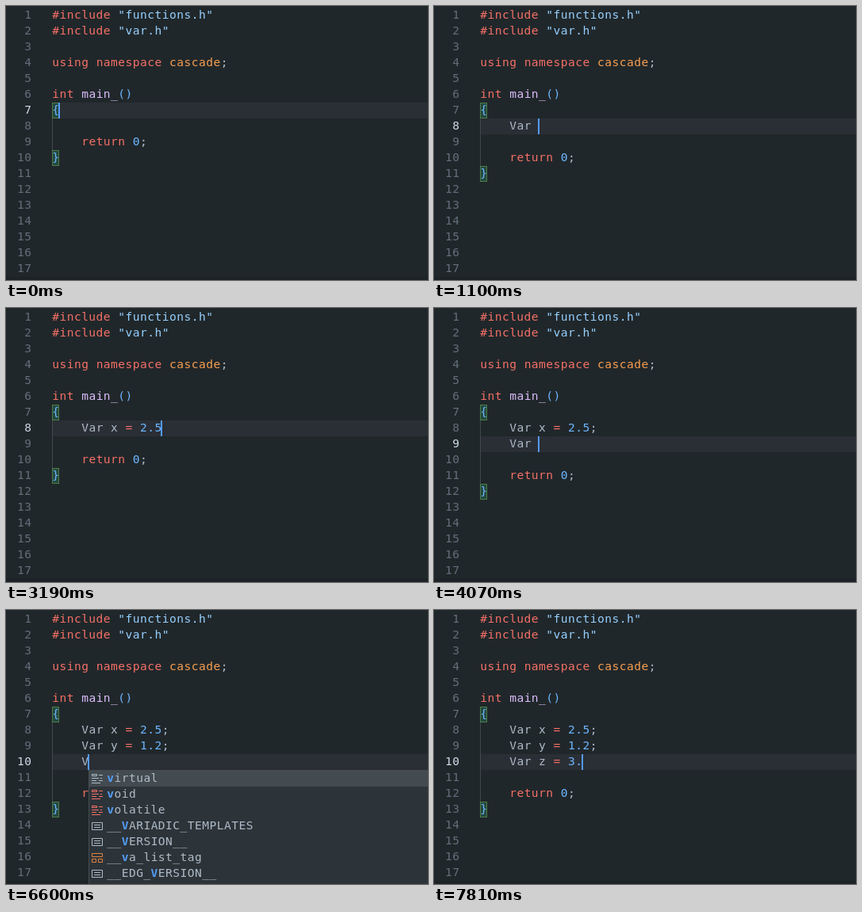
Animation of 532x346 px, one loop 8 s. Source, as an HTML page:

```html
<!DOCTYPE html>
<html lang="en">
<head>
<meta charset="utf-8">
<title>Code editor</title>
<style>
html, body { margin: 0; width: 100%; height: 100%; overflow: hidden; background: #20272a; }
svg { display: block; }
text { font: 14.6px "DejaVu Sans Mono", monospace; letter-spacing: .45px; white-space: pre; }
</style>
</head>
<body>
<svg id="stage" width="532" height="346"></svg>
<script>
const LOOP = 8000, LEFT = 58, CHAR = 9.24, ROW = 20;
const stage = document.getElementById('stage');
const plain = '#adbac7', red = '#f47067', blue = '#6cb6ff', accent = '#539bf5';

const head = ['#include "functions.h"', '#include "var.h"', '', 'using namespace cascade;', '', 'int main_()', '{'];
const tail = ['', '    return 0;', '}'];
const done = ['    Var x = 2.5;', '    Var y = 1.2;'];

// time, active line, its text, flags: o = caret hidden, p = suggestions, d = details
const steps = [
  [0, 7, '{'], [220, 7, '{', 'o'], [440, 8, ''],
  [770, 8, 'V', 'p'], [880, 8, 'V', 'pd'], [990, 8, 'Var', 'pd'], [1100, 8, 'Var '],
  [1430, 8, 'Var ', 'o'], [1650, 8, 'Var '], [1870, 8, 'Var x', 'pd'],
  [2090, 8, 'Var x '], [2200, 8, 'Var x ='], [2310, 8, 'Var x = '], [2530, 8, 'Var x = ', 'o'],
  [2860, 8, 'Var x = 2'], [2970, 8, 'Var x = 2.'], [3190, 8, 'Var x = 2.5'], [3410, 8, 'Var x = 2.5;'],
  [3520, 9, ''], [3850, 9, 'V', 'pd'], [3960, 9, 'Var', 'pd'], [4070, 9, 'Var '],
  [4290, 9, 'Var y', 'pd'], [4400, 9, 'Var y'], [4620, 9, 'Var y ='], [4730, 9, 'Var y = '],
  [5060, 9, 'Var y = ', 'o'], [5280, 9, 'Var y = '], [5390, 9, 'Var y = 1'], [5500, 9, 'Var y = 1.'],
  [5610, 9, 'Var y = 1.2'], [5830, 9, 'Var y = 1.2', 'o'], [6050, 9, 'Var y = 1.2;'], [6270, 10, ''],
  [6490, 10, 'V'], [6600, 10, 'V', 'p'], [6710, 10, 'V', 'pd'], [6820, 10, 'Var', 'pd'], [6930, 10, 'Var '],
  [7150, 10, 'Var z'], [7370, 10, 'Var z ='], [7480, 10, 'Var z = '], [7700, 10, 'Var z = 3'], [7810, 10, 'Var z = 3.']
];

const lists = {
  V: 'virtual void volatile __VARIADIC_TEMPLATES __VERSION__ __va_list_tag __EDG_VERSION__ __cpp_variable_templates __cpp_variadic_templates',
  Var: '__VARIADIC_TEMPLATES __cpp_variable_templates __cpp_variadic_templates',
  x: 'xor xor_eq __x86_64 __x86_64__ __FLT32X_DECIMAL_DIG__ __FLT32X_DENORM_MIN__ __FLT32X_DIG__ __FLT32X_EPSILON__ __FLT32X_HAS_DENORM__',
  y: 'co_yield dynamic_cast typedef typeid typename __BYTE_ORDER__'
};

const icons = {
  keyword: 'M1.5 2.5h6v2h-6zM10 3.5h5M1 7.5h9M12 7.5h2M1 10.5h6M10 10.5h5M1 13.5h11',
  constant: 'M1.5 3.5h13v9h-13zM4 6.5h8M4 9.5h8',
  struct: 'M1.5 2.5h13v4h-13zM1.5 9.5h5v4h-5zM9.5 9.5h5v4h-5z'
};

const lineTop = n => 2 + ROW * (n - 1);
const rect = (x, y, w, h, fill, more = '') =>
  `<rect x="${x}" y="${y}" width="${w}" height="${h}" fill="${fill}" ${more}/>`;
const text = (x, y, s, fill, more = '') => `<text x="${x}" y="${y}" fill="${fill}" ${more}>${s}</text>`;
const stroke = (x, y, d, color) =>
  `<path transform="translate(${x} ${y})" d="${d}" fill="none" stroke="${color}"/>`;

function colorOf(token) {
  if (/^(#\w+|using|namespace|int|return|=)$/.test(token)) return red;
  if (token[0] === '"') return '#96d0ff';
  if (token === 'cascade') return '#f69d50';
  if (token === 'main_') return '#dcbdfb';
  return /^[\d(){}]/.test(token) ? blue : plain;
}

function codeLine(s, y) {
  let out = '';
  for (const m of s.matchAll(/"[^"]*"|#?[A-Za-z_]+|\d[\d.]*|\S/g))
    out += text(LEFT + .2 + m.index * CHAR, y, m[0], colorOf(m[0]));
  return out;
}

function suggestion(word, query, x, y, first) {
  const kind = word === '__va_list_tag' ? 'struct' : word.startsWith('__') ? 'constant' : 'keyword';
  const color = kind === 'struct' ? '#e0823d' : kind === 'constant' || first ? plain : red;
  const at = word.toLowerCase().indexOf(query.toLowerCase()), end = at + query.length;
  const label = `${word.slice(0, at)}<tspan fill="${accent}" font-weight="700">${word.slice(at, end)}</tspan>${word.slice(end)}`;
  return stroke(x + 3, y + 2, icons[kind], color) + text(x + 23.2, y + 14, label, plain);
}

function popup(line, input, details) {
  const query = input.split(' ').pop();
  const words = lists[query].split(' ');
  const anchor = query === 'Var' ? 5 : 4 + input.length;
  const x = Math.round(LEFT + anchor * CHAR), y = lineTop(line + 1);
  const border = 'stroke="#444c52"', fill = '#2d3439';
  const long = words.length > 8, hovered = long && line === 8;
  let out = '';
  if (details) {
    out += rect(-1.5, y + .5, x + 2, 61, fill, border);
    out += stroke(x - 16, y + 10, 'M0 0l8 8M8 0l-8 8', plain);
  }
  out += rect(x + .5, y + .5, 430, (long ? 12 : words.length) * ROW + 1, fill, border);
  out += rect(x + 1, y + 1, 429, ROW, '#434b51');
  if (hovered) out += rect(x + 1, y + 61, 429, ROW, '#32383d');
  words.forEach((w, i) => out += suggestion(w, query, x, y + 1 + i * ROW, !i));
  if (hovered) out += rect(x + 421, y + 1, 9, 200, '#8b949e', 'opacity=".25"');
  return out;
}

function draw([, line, input, flags = '']) {
  const typing = line > 7;
  const current = typing ? '    ' + input : input;
  const code = typing ? [...head, ...done.slice(0, line - 8), current, ...tail] : [...head, ...tail];
  const last = code.length, y = lineTop(line);
  let out = rect(0, 0, 532, 346, '#20272a') + rect(0, 342, 532, 4, '#1c2225');
  out += rect(LEFT, y, 474, ROW, '#2a2e35');
  out += rect(LEFT, lineTop(8), 1, lineTop(last) - lineTop(8), '#41484c');
  for (const n of [7, last])
    out += rect(LEFT + .5, lineTop(n) + .5, 8, 19, '#25483f', 'stroke="#4b7d49"');
  for (let n = 1; n <= 17; n++) {
    const base = lineTop(n) + 14;
    out += text(32.6, base, n, n === line ? '#cdd9e5' : '#636e7b', 'text-anchor="end"');
    out += codeLine(code[n - 1] || '', base);
  }
  if (!flags.includes('o'))
    out += rect(Math.floor(LEFT + current.length * CHAR - .7), y, 2, ROW, accent);
  if (flags.includes('p')) out += popup(line, input, flags.includes('d'));
  stage.innerHTML = out;
}

let shown;
function tick() {
  const t = performance.now() % LOOP;
  const step = steps.findLast(s => s[0] <= t);
  if (step !== shown) draw(shown = step);
  requestAnimationFrame(tick);
}
tick();
</script>
</body>
</html>
```
